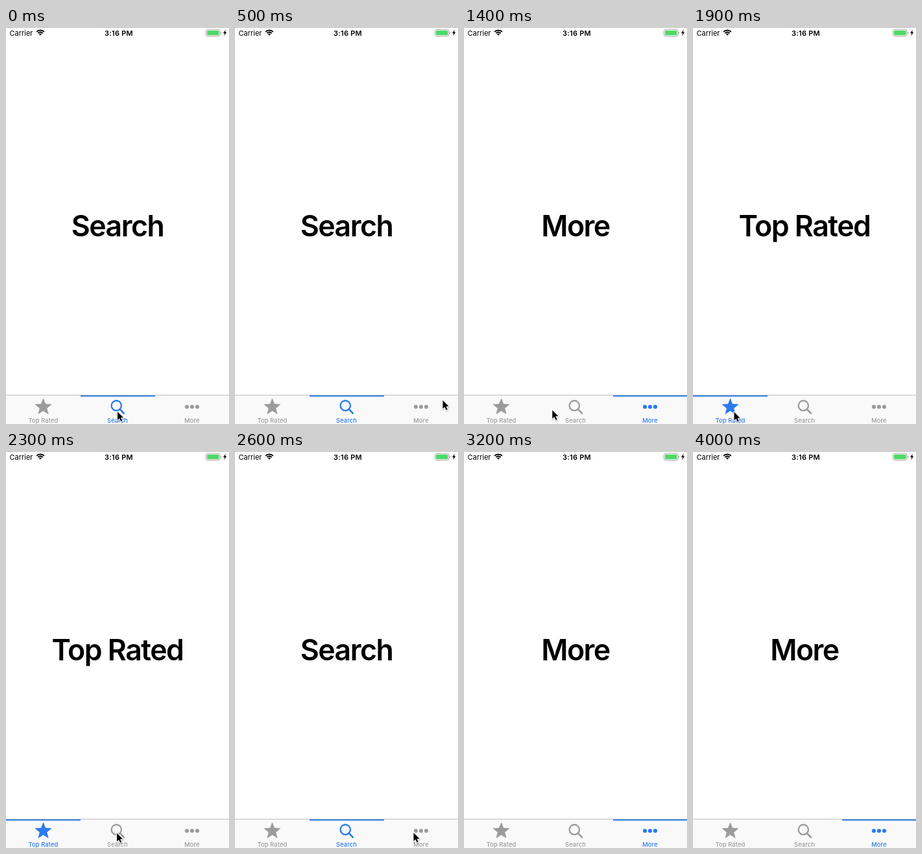
These frames come from a looping animation (344 px wide and 610 px high, 4.1 s). An HTML page:

```html
<!DOCTYPE html>
<html lang="en">
<head>
<meta charset="utf-8">
<title>Tab bar</title>
<style>
  html, body { margin: 0; height: 100%; overflow: hidden; background: #fff; }
  svg { display: block; width: 344px; height: 610px; font-family: Inter, Roboto, sans-serif; }
  #title { font-size: 44.7px; font-weight: 600; letter-spacing: -.034em; }
  .status { font-size: 11px; }
  .clock { font-weight: 600; letter-spacing: .25px; }
  .mid { text-anchor: middle; }
  .tab { color: #9b9b9b; fill: currentColor; stroke: none; }
  .tab.on { color: #2a7bf0; }
  .tab text { font-size: 9.3px; font-weight: 500; letter-spacing: .13px; }
  .line { fill: none; stroke: currentColor; }
</style>
</head>
<body>
<svg viewBox="0 0 344 610">
  <text class="status" x="5.5" y="11.5">Carrier</text>
  <g transform="translate(53 11.8)">
    <path d="M-5.9-5.9A8.3 8.3 0 0 1 5.9-5.9M-3.7-3.7A5.2 5.2 0 0 1 3.7-3.7" fill="none" stroke="#000" stroke-width="1.9"/>
    <path d="M0 0L-2.2-2.2A3.1 3.1 0 0 1 2.2-2.2Z"/>
  </g>
  <text class="status clock mid" x="174" y="11.5">3:16 PM</text>
  <rect x="308.5" y="2.5" width="21.5" height="10" rx="2" fill="none" stroke="#999" stroke-width=".9"/>
  <rect x="310" y="4" width="18.5" height="7" rx=".8" fill="#4cd964"/>
  <path d="M331 5.7a2 2 0 0 1 0 3.6z" fill="#999"/>
  <path d="M339 2.5L335 8h2.3l-1.2 4.2L340.4 6.4h-2.4z"/>

  <text id="title" class="mid" x="172" y="321"></text>

  <rect y="565" width="344" height="45" fill="#f9f9f9"/>
  <rect y="565" width="344" height="1" fill="#bfbfbf"/>
  <rect id="bar" y="566" width="115" height="1.8" fill="#2e7ae6"/>
  <g class="tab">
    <path id="star" stroke="currentColor" stroke-width=".7" stroke-linejoin="round"/>
    <text class="mid" x="57.5" y="608">Top Rated</text>
  </g>
  <g class="tab">
    <circle class="line" cx="170.3" cy="581.7" r="7.7" stroke-width="2.3"/>
    <path class="line" d="M175.8 587.2l6 6.3" stroke-width="2.6" stroke-linecap="round"/>
    <text class="mid" x="172" y="608">Search</text>
  </g>
  <g class="tab">
    <circle cx="279" cy="583.5" r="3.1"/>
    <circle cx="287" cy="583.5" r="3.1"/>
    <circle cx="295" cy="583.5" r="3.1"/>
    <text class="mid" x="287" y="608">More</text>
  </g>
  <g id="cursor" stroke-linejoin="round">
    <path d="M.4 1.2v13l3-2.8 2.2 4.8 2.1-.9-2.2-4.8h4.1z" stroke="#000" stroke-width="3" opacity=".16"/>
    <path d="M0 0v13l3-2.8 2.2 4.8 2.1-.9-2.2-4.8h4.1z" stroke="#fff" stroke-width="2" paint-order="stroke"/>
  </g>
</svg>
<script>
const $ = id => document.getElementById(id);
const tabs = [...document.querySelectorAll('.tab')];
const STEP = 100, LOOP = 4100;

// Taps: [time, tab]
const taps = [[0, 1], [800, 2], [1900, 0], [2400, 1], [2900, 2]];

// Pointer glides: [start, end, x, y], easing from wherever the last one stopped
const home = [172, 591];
const glides = [
  [200, 500, 320.5, 573.5],
  [900, 1700, 51, 592],
  [1800, 2300, 171, 587],
  [2400, 2600, 275.5, 586.5],
  [2900, 3200, 400, 585]
];

const clamp = v => Math.min(1, Math.max(0, v));
const ease = u => u * u * (3 - 2 * u);

function pointer(t) {
  return glides.reduce(([x, y], [from, to, gx, gy]) => {
    const k = ease(clamp((t - from) / (to - from)));
    // vertical travel leads, so the path bows toward the bottom edge
    return [x + (gx - x) * k, y + (gy - y) * (gy > y ? Math.sqrt(k) : k)];
  }, home);
}

const starPoints = Array.from({ length: 10 }, (_, i) => {
  const a = i * Math.PI / 5, r = i % 2 ? 5.6 : 13;
  return [57.5 + r * Math.sin(a), 583.9 - r * Math.cos(a)];
});
$('star').setAttribute('d', `M${starPoints.join('L')}Z`);

function draw(now) {
  const t = Math.floor(now % LOOP / STEP) * STEP;
  const tab = taps.findLast(([time]) => time <= t)[1];
  $('title').textContent = tabs[tab].textContent.trim();
  $('bar').setAttribute('x', tab * 115);
  tabs.forEach((el, i) => el.classList.toggle('on', i === tab));
  $('cursor').setAttribute('transform', `translate(${pointer(t)})`);
}

const start = performance.now();
function loop() {
  draw(performance.now() - start);
  requestAnimationFrame(loop);
}
loop();
</script>
</body>
</html>
```
